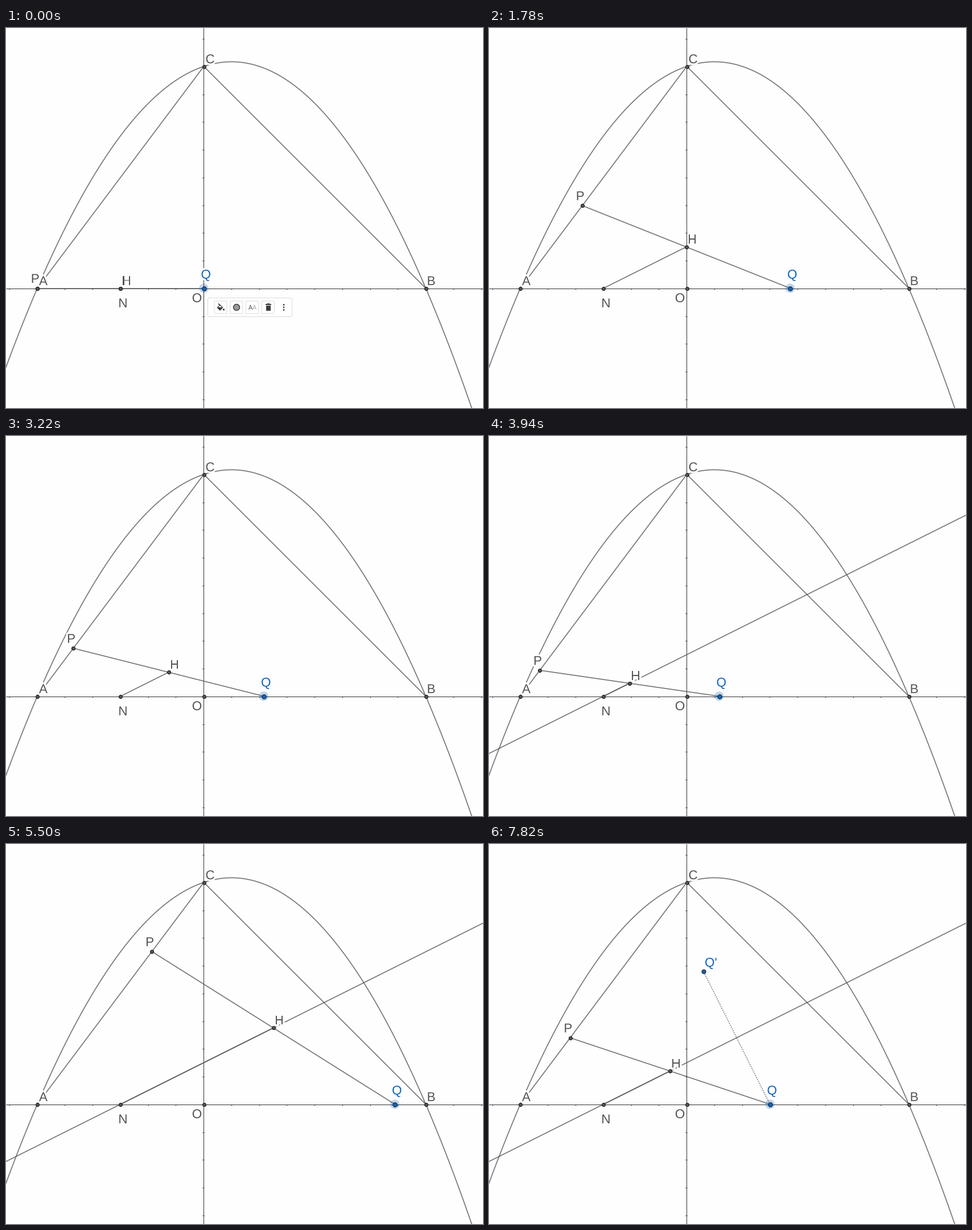
A matplotlib script that plays this animation: 838 px wide and 668 px high, repeating every 8 s.

```python
import numpy as np
import matplotlib.pyplot as plt
from matplotlib.animation import FuncAnimation
from matplotlib.patches import Circle, FancyBboxPatch, Polygon, Rectangle
from matplotlib.patheffects import withStroke

W, H, DPI = 838, 668, 64
STEP, LOOP = 20, 8000
PT = 72 / DPI                      # points per pixel
UNIT, OX, OY = 48.75, 347.5, 457.5

BG, LINE, TEXT, BLUE = "#fefefe", "#555555", "#555555", "#1565c0"
FONT = "Liberation Sans"


def linear(u):
    return u


def ease_in(u):
    return u ** 1.56


def ease_out(u):
    return 1 - (1 - u) ** 2


def smooth(u):
    return u * u * (3 - 2 * u)


# Drags of Q: first and last jump in ms, number of jumps, final OQ in px, easing
DRAGS = [(340, 1060, 7, 77, ease_in), (1170, 1890, 7, 199, linear),
         (2020, 2130, 2, 259, linear), (2280, 2610, 4, 184, ease_in),
         (2750, 3450, 7, 98.5, ease_out), (3700, 3940, 3, 57, linear),
         (4220, 4900, 7, 225, ease_in), (5030, 5620, 6, 338.7, ease_out),
         (5760, 6470, 7, 120, smooth), (7580, 7820, 3, 146, linear)]
TOUCH = 340                        # toolbar closes
LINE_ON, LINE_DRAG = 3450, 3700    # line appears, dragging goes on
IMAGE_ON, IMAGE_DRAG = 6470, 7580  # mirrored point appears, dragging goes on


def drag_span(t):
    """Length OQ = AP at time t."""
    span = 0
    for first, last, n, goal, ease in DRAGS:
        done = np.sum(np.linspace(first, last, n) <= t)
        span += (goal - span) * ease(done / n)
        if done < n:
            break
    return span


def at(x, y):
    return np.array([OX + x * UNIT, OY - y * UNIT])


A, B, C, O, N = at(-6, 0), at(8, 0), at(0, 8), at(0, 0), at(-3, 0)
ALONG_AC = np.array([0.6, -0.8])   # also the mirrored direction of the x axis

fig = plt.figure(figsize=(W / DPI, H / DPI), dpi=DPI, facecolor=BG)
ax = fig.add_axes([0, 0, 1, 1])
ax.set(xlim=(0, W), ylim=(H, 0))
ax.axis("off")


def stroke(*pts, width=1.7, color=LINE, alpha=0.8, z=2, **kw):
    xs, ys = zip(*pts) if pts else ((), ())
    return ax.plot(xs, ys, color=color, lw=width * PT, alpha=alpha, zorder=z,
                   solid_capstyle="butt", **kw)[0]


def dots(pts, size, fill, edge="#1a1a1a"):
    xs, ys = zip(*pts)
    return ax.plot(xs, ys, "o", ms=size * PT, mfc=fill, mec=edge,
                   mew=1.1 * PT, zorder=6, snap=False)[0]


def label(s, x, y, color=TEXT):
    return ax.text(x, y, s, size=22.5 * PT, family=FONT, color=color,
                   ha="center", va="baseline", zorder=4,
                   path_effects=[withStroke(linewidth=6.5 * PT, foreground=BG)])


def put(line, *pts):
    line.set_data(*zip(*pts))


# Axes and ticks, nudged so that they snap to the pixel row and column of O
ax_x, ax_y = OX - 0.3, OY + 0.3
axis = dict(width=1, color="#303030", alpha=1, z=1)
stroke((0, ax_y), (W, ax_y), **axis)
stroke((ax_x, 0), (ax_x, H), **axis)
for k in range(-7, 11):
    x, y = at(k, k) + (-0.3, 0.3)
    stroke((x, OY), (x, OY + 2.5), **axis)
    stroke((OX - 2.5, y), (OX, y), **axis)

# Parabola and triangle sides
u = np.linspace(-7.3, 10, 300)
stroke(*zip(*at(u, -(u + 6) * (u - 8) / 6)))
stroke(A, C)
stroke(C, B)
dots([A, B, C, O, N], 6, "#555555")
for s, x, y in [("A", 65.5, 452), ("B", 747, 452), ("C", 358.5, 62),
                ("O", 335.5, 482), ("N", 205.5, 491)]:
    label(s, x, y)

# Moving parts
pq, nh = stroke(), stroke()
long_line = stroke((0, N[1] + N[0] / 2), (W, N[1] - (W - N[0]) / 2))
mirror = stroke(width=1.6, alpha=0.9, ls=(0, (1, 1.3)), dash_capstyle="butt")
ph = dots([A, N], 6, "#555555")
q_dot = dots([O], 7.4, BLUE)
image_dot = dots([O], 7, BLUE)
glow = ax.add_patch(Circle(O, 8.2, fc=BLUE, alpha=0.27, lw=0, zorder=5))
p_text, h_text = label("P", 0, 0), label("H", 0, 0)
q_text, image_text = label("Q", 0, 0, BLUE), label("Q'", 0, 0, BLUE)


def make_toolbar():
    dark, edge = "#3c3c3c", "#dcdcdc"
    parts = []

    def add(patch, z=9):
        patch.set_zorder(z)
        parts.append(ax.add_patch(patch))

    def box(x, y, w, h, r, z):
        add(FancyBboxPatch((x, y), w, h, fc="white", ec=edge, lw=PT,
                           boxstyle=f"round,pad=0,rounding_size={r}"), z)

    box(354.5, 474.5, 148, 33, 2.5, 7)
    for k in range(4):
        box(366 + 27.8 * k, 480, 22, 22, 1.5, 8)
    # bucket
    add(Polygon([(370.5, 491.5), (376, 486), (381.5, 491.5), (376, 497)],
                fc=dark, lw=0))
    add(Polygon([(372.8, 491), (376, 487.8), (379.2, 491)],
                fc="white", lw=0), 10)
    parts.append(stroke((373, 484.5), (377, 488.5), color=dark, alpha=1, z=9))
    add(Circle((382.5, 495), 1.6, fc=dark, lw=0))
    # point style
    add(Circle((405, 491), 5.4, fc="#9a9a9a", ec=dark, lw=1.5 * PT))
    # label style
    for x, color in ((429.3, "#555555"), (436.6, "#aaaaaa")):
        parts.append(ax.text(x, 495, "A", size=10.5 * PT, color=color,
                             family=FONT, ha="center", zorder=9))
    # bin
    for x, y, w, h in ((456.5, 488, 8, 9), (455.5, 485.3, 10, 1.5),
                       (458.5, 484.3, 4, 1.2)):
        add(Rectangle((x, y), w, h, fc=dark, lw=0))
    # menu
    for k in (-1, 0, 1):
        add(Circle((488, 491 + 4.5 * k), 1.4, fc=dark, lw=0))
    return parts


toolbar = make_toolbar()


def draw(i):
    t = (i + 1) * STEP
    s = drag_span(t)
    q = O + (s, 0)
    p = A + s * ALONG_AC
    h = (p + q) / 2
    image = N + (q[0] - N[0]) * ALONG_AC

    put(pq, p, q)
    put(nh, N, h)
    put(mirror, q, image)
    put(ph, p, h)
    put(q_dot, q)
    put(image_dot, image)
    glow.center = q
    p_text.set_position(p + (-3.7, -9.5))
    h_text.set_position(h + (10.5, -6))
    q_text.set_position(q + (3.7, -17))
    image_text.set_position(image + (13.2, -8))

    nh.set_visible(s > 0)
    long_line.set_visible(t >= LINE_ON)
    for part in (mirror, image_dot, image_text):
        part.set_visible(t >= IMAGE_ON)
    glow.set_visible(not (LINE_ON <= t < LINE_DRAG
                          or IMAGE_ON <= t < IMAGE_DRAG))
    for part in toolbar:
        part.set_visible(t < TOUCH)
    return []


anim = FuncAnimation(fig, draw, frames=LOOP // STEP, interval=STEP,
                     init_func=lambda: draw(0), repeat=True, repeat_delay=0,
                     blit=False)
plt.show()
```
